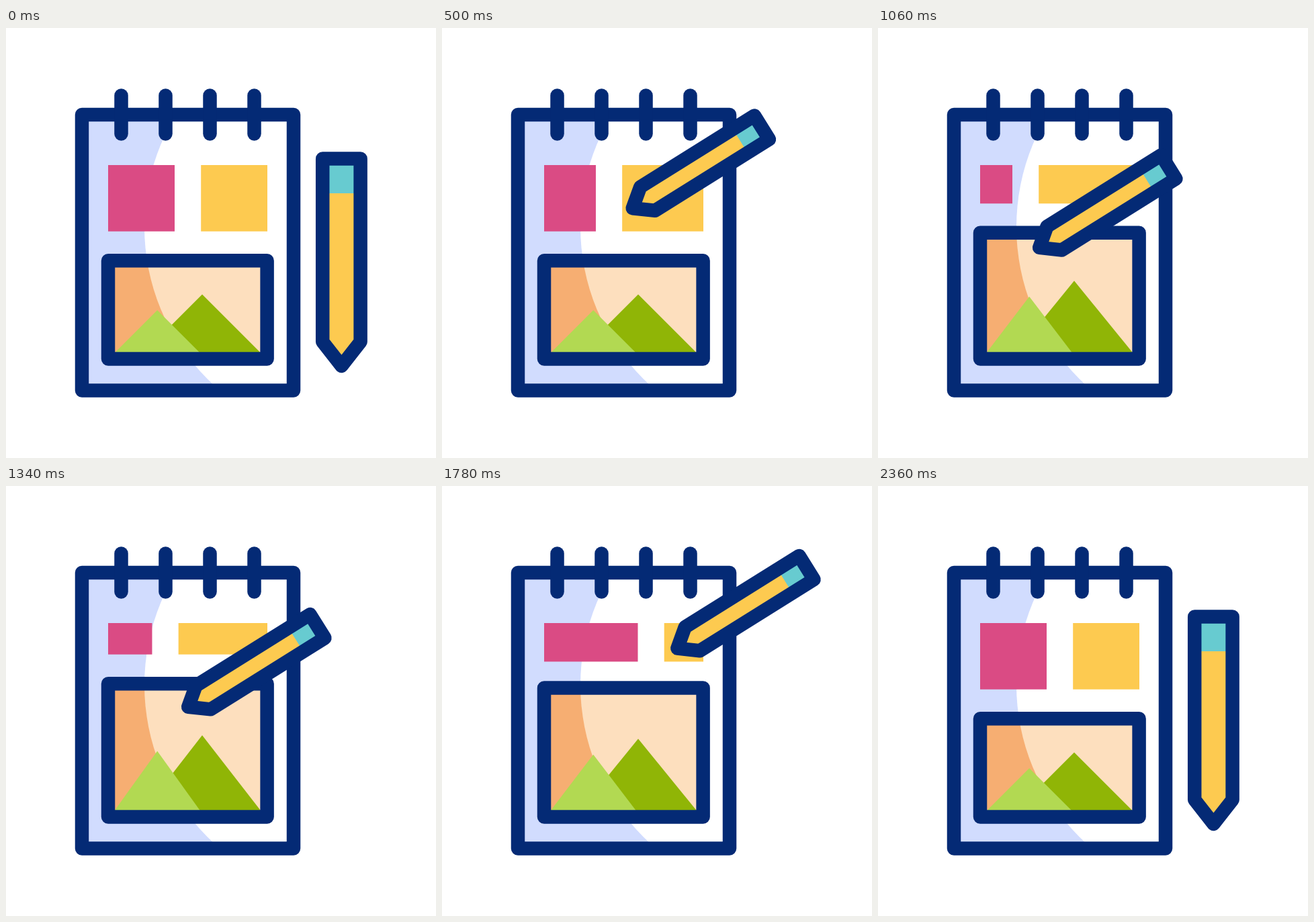
Animation of 640 by 640 pixels, one loop 2.4 s. Source, as an HTML page with a canvas:

```html
<!DOCTYPE html>
<html>
<head>
<meta charset="utf-8">
<style>
html, body { margin: 0; height: 100%; overflow: hidden; background: #fff; }
canvas { display: block; }
</style>
</head>
<body>
<canvas id="stage" width="640" height="640"></canvas>
<script>
const ctx = document.getElementById('stage').getContext('2d');
const LOOP = 2400, STROKE = 20.5;
const NAVY = '#042a75', YELLOW = '#fdca50';
const HOME = { x: 499.4, y: 348.75 };

// The places the pencil's centre visits, each reached from the one before.
const VISITS = [
  { from: 20, to: 310, x: 453, y: 210.6 },
  { from: 310, to: 728, x: 285, y: 205 },
  { from: 728, to: 1220, x: 353, y: 287 },
  { from: 1220, to: 1700, x: 443.4, y: 171.8 },
  { from: 1700, to: 2160, x: 480.5, y: 291 },
  { from: 2160, to: 2360, ...HOME },
];

// Goes from 0 to 1 between two times, easing in and out.
function ease(t, from, to) {
  const s = Math.min(1, Math.max(0, (t - from) / (to - from)));
  return s * s * (3 - 2 * s);
}

function pencilCentre(t) {
  return VISITS.reduce((at, visit) => {
    const p = ease(t, visit.from, visit.to);
    return { x: at.x + (visit.x - at.x) * p, y: at.y + (visit.y - at.y) * p };
  }, HOME);
}

function box(color, left, top, right, bottom) {
  ctx.fillStyle = color;
  ctx.fillRect(left, top, right - left, bottom - top);
}

function outline(left, top, right, bottom) {
  ctx.strokeRect(left, top, right - left, bottom - top);
}

// A panel in its shaded colour, lit by one large circle.
function litPanel(shade, light, left, top, right, bottom) {
  ctx.save();
  ctx.beginPath();
  ctx.rect(left, top, right - left, bottom - top);
  ctx.clip();
  box(shade, left, top, right, bottom);
  ctx.fillStyle = light;
  ctx.beginPath();
  ctx.arc(526, 296, 320, 0, Math.PI * 2);
  ctx.fill();
  ctx.restore();
}

function mountain(color, x, halfBase, growth) {
  const foot = 485;
  ctx.fillStyle = color;
  ctx.beginPath();
  ctx.moveTo(x - halfBase, foot);
  ctx.lineTo(x, foot - halfBase - growth);
  ctx.lineTo(x + halfBase, foot);
  ctx.fill();
}

function drawNotebook() {
  litPanel('#d1dcfe', '#fff', 113, 129, 428, 539.5);
  outline(113, 129, 428, 539.5);
  for (let x = 171.5; x < 400; x += 66) {
    ctx.beginPath();
    ctx.moveTo(x, 100.5);
    ctx.lineTo(x, 157.5);
    ctx.stroke();
  }
}

function drawLayout(t) {
  const raise = ease(t, 720, 1200), settle = ease(t, 1670, 2050);
  const gap = 51 * (2 * ease(t, 1220, 1680) - ease(t, 310, 730) - settle);
  const lift = raise - settle;

  const bottom = 302.7 - 52 * lift;
  box('#da4b84', 152, 204, 251 + gap, bottom);
  box(YELLOW, 290.2 + gap, 204, 389, bottom);

  const top = 346.2 - 52 * (raise - ease(t, 1700, 2076));
  litPanel('#f6ae72', '#fddfbe', 152, top, 388.6, 492.6);
  mountain('#90b506', 292, 88.5, 25.5 * lift);
  mountain('#b2d952', 225.2, 65, 25.5 * lift);
  outline(152, top, 388.6, 492.6);
}

function drawPencil(t) {
  const { x, y } = pencilCentre(t);
  const tilt = ease(t, 20, 310) - ease(t, 2160, 2360);
  const scale = 1 - 0.265 * tilt;
  const body = new Path2D('M-28.2-154.25H28.2V118.25L0 154.25L-28.2 118.25Z');
  ctx.save();
  ctx.translate(x, y);
  ctx.rotate(tilt * 58 * Math.PI / 180);
  ctx.scale(scale, scale);
  ctx.fillStyle = YELLOW;
  ctx.fill(body);
  box('#67cbd0', -28.2, -154.25, 28.2, -102.75);
  ctx.lineWidth = STROKE / scale; // the outline keeps its weight
  ctx.stroke(body);
  ctx.restore();
}

function draw(t) {
  box('#fff', 0, 0, 640, 640);
  ctx.strokeStyle = NAVY;
  ctx.lineWidth = STROKE;
  ctx.lineJoin = ctx.lineCap = 'round';
  drawNotebook();
  drawLayout(t);
  drawPencil(t);
}

const start = performance.now();
function tick() {
  draw((performance.now() - start) % LOOP);
  requestAnimationFrame(tick);
}
tick();
</script>
</body>
</html>
```
